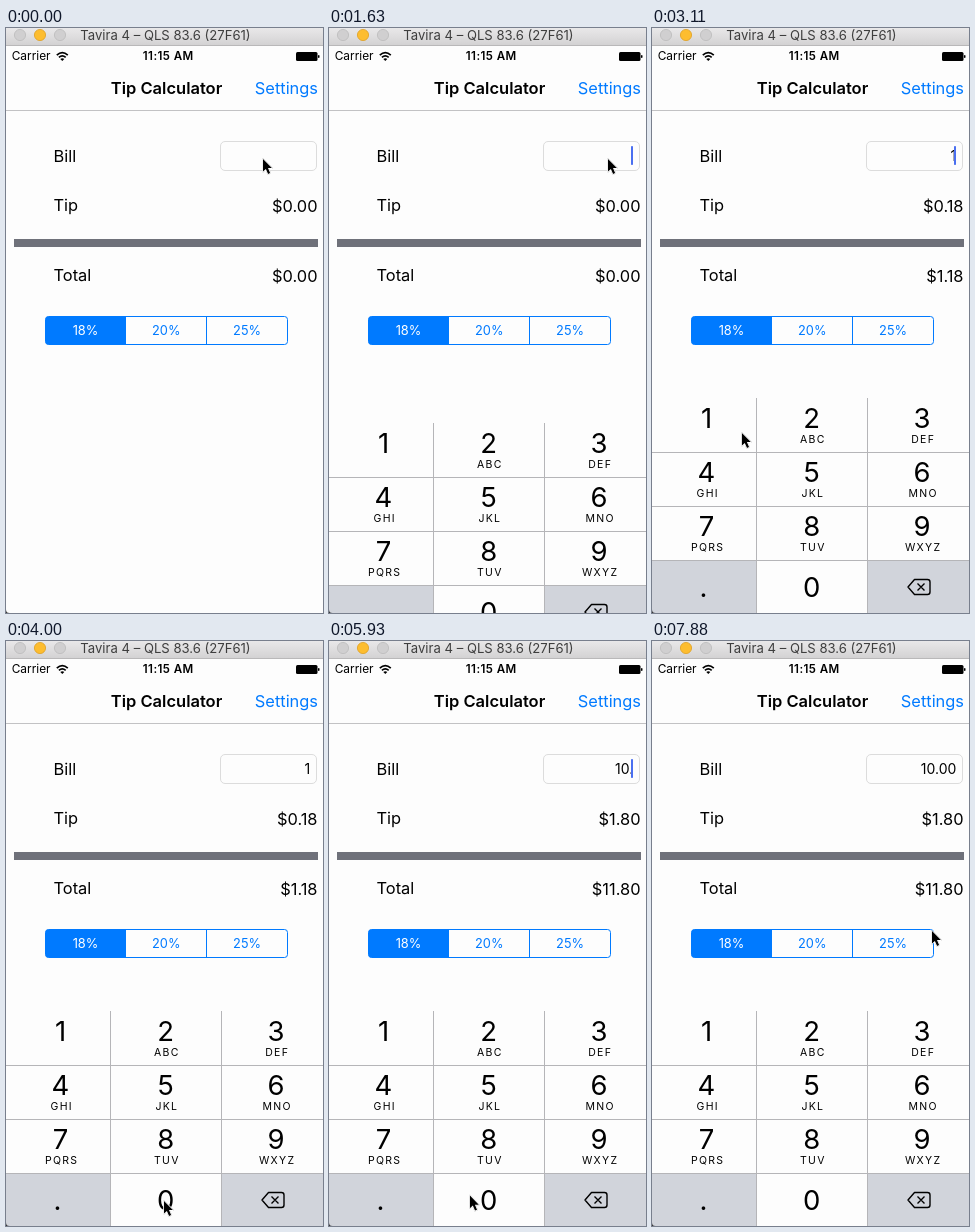
Recreate the animation shown at these times as an HTML page. Size 317 px wide and 585 px high, loop 8 s.

```html
<!DOCTYPE html>
<html lang="en">
<head>
<meta charset="utf-8">
<title>Tip Calculator</title>
<style>
  html, body { margin: 0; width: 100%; height: 100%; overflow: hidden; background: #fdfdfd; }
  svg { display: block; width: 317px; height: 585px; font-family: Inter, Roboto, sans-serif; }
  #cursor { filter: drop-shadow(0 .8px .7px rgba(0, 0, 0, .4)); }
</style>
</head>
<body>
<svg id="stage" viewBox="0 0 317 585">
  <defs>
    <linearGradient id="chrome" x2="0" y2="1">
      <stop stop-color="#e9e8e9"/><stop offset="1" stop-color="#d2d1d2"/>
    </linearGradient>
  </defs>
  <rect width="317" height="585" fill="#fdfdfd"/>
  <g id="screen"></g>
  <g id="keyboard"></g>
  <path d="M0 581.5Q0 585 3.5 585H0Z" fill="#333"/>
  <path id="cursor" d="M0 0V12.6L2.9 9.9 5.1 15 7.1 14.1 5 9.1H8.9Z"
        stroke="#fff" stroke-width="1.6" stroke-linejoin="round" paint-order="stroke"/>
</svg>
<script>
const LOOP = 8000, STEP = 148.2, LAST = 53;
const BLUE = '#007aff', GREY = '#d1d4db', WHITE = '#fdfdfd', LINE = '#b5b5b8';
const $ = id => document.getElementById(id);
const screen = $('screen'), keyboard = $('keyboard'), cursor = $('cursor');

function add(parent, tag, attrs, content) {
  const el = document.createElementNS('http://www.w3.org/2000/svg', tag);
  for (const k in attrs) el.setAttribute(k, attrs[k]);
  if (content) el.textContent = content;
  parent.appendChild(el);
  return el;
}
const rect = (p, x, y, width, height, fill, more) =>
  add(p, 'rect', { x, y, width, height, fill, ...more });
const text = (p, x, y, size, str, more) =>
  add(p, 'text', { x, y, 'font-size': size, ...more }, str);
const path = (p, d, more) => add(p, 'path', { d, fill: 'none', ...more });
const MID = { 'text-anchor': 'middle' }, END = { 'text-anchor': 'end' };

// Window title bar
rect(screen, 0, 0, 317, 18, 'url(#chrome)');
rect(screen, 0, 17, 317, 1, '#b9b8b9');
[['#d0cfd0', '#bbb'], ['#fdbd2f', '#dfa023'], ['#d0cfd0', '#bbb']].forEach(([fill, stroke], i) =>
  add(screen, 'circle', { cx: 14 + 20 * i, cy: 7, r: 5.6, fill, stroke, 'stroke-width': .8 }));
text(screen, 159.5, 12, 13.1, 'Tavira 4 – QLS 83.6 (27F61)', { ...MID, fill: '#3e3e3e' });

// Status bar
text(screen, 5.7, 32, 11.9, 'Carrier');
text(screen, 162.2, 32, 11.6, '11:15 AM', { ...MID, 'font-weight': 600, 'letter-spacing': .4 });
path(screen, 'M50.8 27.2Q56.3 22.2 61.8 27.2M52.9 29.4Q56.3 26.4 59.7 29.4', { stroke: '#000', 'stroke-width': 1.7 });
path(screen, 'M54.3 31Q56.3 29.4 58.3 31L56.3 33Z', { fill: '#000' });
rect(screen, 290, 24, 21.5, 9, '#000', { rx: 1.5 });
rect(screen, 312, 27, 1.5, 3, '#000', { rx: .7 });

// Navigation bar
text(screen, 160.5, 66, 16.5, 'Tip Calculator', { ...MID, 'font-weight': 600 });
text(screen, 312, 66, 16.4, 'Settings', { ...END, fill: BLUE });
rect(screen, 0, 82, 317, 1, '#c2c2c4');

// Form
[['Bill', 134], ['Tip', 183], ['Total', 253]].forEach(([s, y]) => text(screen, 47.5, y, 16.4, s));
rect(screen, 214.5, 113.5, 96, 29, WHITE, { rx: 4.5, stroke: '#dcdcdc' });
const bill = text(screen, 304.3, 133, 14, '', END);
const caret = rect(screen, 302, 118, 2, 19, '#4a6ff0', { rx: .8 });
const tip = text(screen, 311.5, 184, 16.4, '', END);
const total = text(screen, 311.5, 254, 16.4, '', END);
rect(screen, 8, 211, 304, 8, '#6f717a');

// Segmented control
path(screen, 'M120 288.5H42.5Q39.5 288.5 39.5 291.5V313.5Q39.5 316.5 42.5 316.5H120Z', { fill: BLUE });
rect(screen, 39.5, 288.5, 242, 28, 'none', { rx: 3, stroke: BLUE });
path(screen, 'M119.5 288V317M200.5 288V317', { stroke: BLUE });
['18%', '20%', '25%'].forEach((s, i) =>
  text(screen, 79.5 + 80.8 * i, 307, 12.8, s, { ...MID, fill: i ? BLUE : '#fff' }));

// Number pad
const COLS = [[0, 105, 54.5], [105, 111, 159.7], [216, 101, 270]];
const LETTERS = ['', 'ABC', 'DEF', 'GHI', 'JKL', 'MNO', 'PQRS', 'TUV', 'WXYZ'];
const keys = {};
[...'123456789.0<'].forEach((name, i) => {
  const [x, w, cx] = COLS[i % 3], y = 370 + 54 * Math.floor(i / 3), special = name === '.' || name === '<';
  const base = special ? GREY : WHITE;
  keys[name] = { base, down: special ? WHITE : GREY, el: rect(keyboard, x, y, w, 54, base) };
  if (name === '<') return;
  const last = i > 8;
  text(keyboard, name === '.' ? 51.5 : cx, y + (last ? 37 : 30), 27.5, name, MID);
  if (LETTERS[i]) text(keyboard, cx + 1.2, y + 45, 10.5, LETTERS[i], { ...MID, 'letter-spacing': 1.3 });
});
path(keyboard, 'M0 424.5H317M0 478.5H317M0 532.5H317M104.5 370V586M215.5 370V586', { stroke: LINE });
path(keyboard, 'M262.5 551.5H275.5Q278 551.5 278 554V564Q278 566.5 275.5 566.5H262.5L256 559ZM265.5 555.5L272.5 562.5M272.5 555.5L265.5 562.5',
  { stroke: '#000', 'stroke-width': 1.4, 'stroke-linejoin': 'round' });

const MOVES = [
  [0, 257, 131], [2, 256, 130.5], [3, 256, 130.5], [6, 303, 129], [7, 279, 131], [11, 279, 131],
  [16, 82, 387], [20, 82, 387], [25, 158, 560], [30, 158, 560], [35, 55, 562], [38, 55, 562],
  [41, 171, 552], [44, 175, 549], [47, 177, 549], [53, 280, 290]
];
const PRESSES = [['1', 19, 21], ['0', 28, 30], ['.', 36, 38], ['0', 42, 43], ['0', 46, 47]];
const FOCUS = 9, BLINK = 6.75;

function cursorAt(n) {
  let i = 1;
  while (i < MOVES.length - 1 && n > MOVES[i][0]) i++;
  const [a, ax, ay] = MOVES[i - 1], [b, bx, by] = MOVES[i];
  const p = (n - a) / (b - a), e = p * p * (3 - 2 * p);
  return [ax + (bx - ax) * e, ay + (by - ay) * e];
}

function draw(n) {
  cursor.setAttribute('transform', `translate(${cursorAt(n)})`);

  const slide = n < FOCUS ? 220 : n > 13 ? 0 : 25 * Math.exp((11 - n) * .95);
  keyboard.setAttribute('transform', `translate(0 ${Math.round(slide)})`);

  let typed = '', since = FOCUS;
  for (const k in keys) keys[k].el.setAttribute('fill', keys[k].base);
  for (const [k, from, to] of PRESSES) {
    if (n >= to) { typed += k; since = to; }
    else if (n >= from) keys[k].el.setAttribute('fill', keys[k].down);
  }
  const on = n >= FOCUS && (n - since) % BLINK < BLINK / 2;
  caret.setAttribute('visibility', on ? 'visible' : 'hidden');

  const amount = Number(typed) || 0;
  bill.textContent = typed;
  tip.textContent = '$' + (amount * .18).toFixed(2);
  total.textContent = '$' + (amount * 1.18).toFixed(2);
}

const start = performance.now();
function tick() {
  const t = (performance.now() - start) % LOOP;
  draw(Math.min(LAST, Math.floor((t + 8) / STEP)));
  requestAnimationFrame(tick);
}
tick();
</script>
</body>
</html>
```
